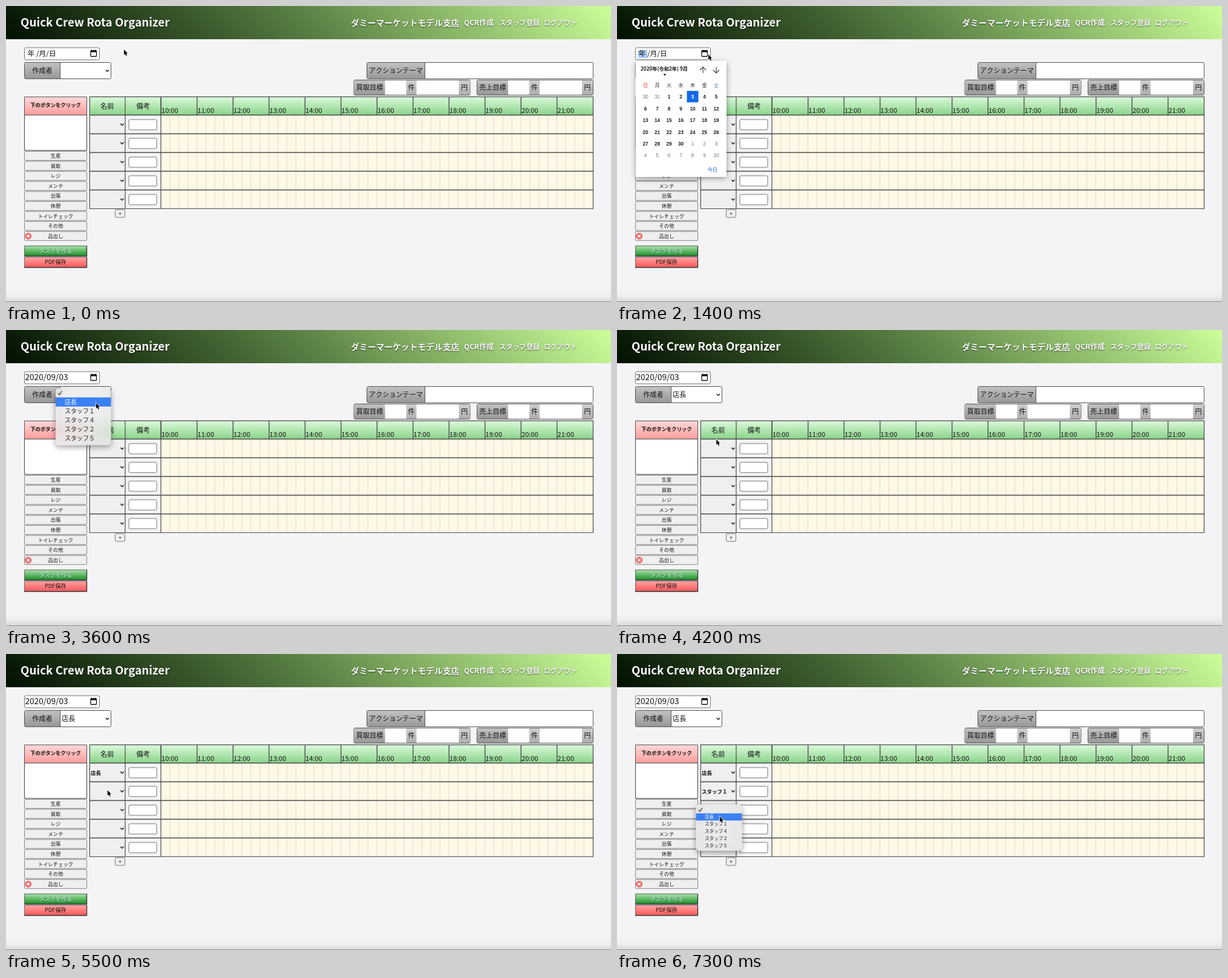
An HTML page with a canvas for the animation above (7400 ms loop, 1000 by 490 pixels).

```html
<!DOCTYPE html>
<html lang="ja">
<head>
<meta charset="utf-8">
<title>Quick Crew Rota Organizer</title>
<style>
html, body { margin: 0; width: 100%; height: 100%; overflow: hidden; background: #f4f4f6; }
canvas { display: block; }
</style>
</head>
<body>
<canvas id="stage" width="1000" height="490"></canvas>
<script>
const canvas = document.getElementById('stage');
const ctx = canvas.getContext('2d');
const JP = '"Noto Sans CJK JP", "Noto Sans CJK", sans-serif';
const LATIN = '"Liberation Sans", Arial, sans-serif';
const LOOP = 7400, HOUR = 59.5, ROW = 31;
const STAFF = ['店長', 'スタッフ１', 'スタッフ４', 'スタッフ２', 'スタッフ５'];
const TASKS = ['生産', '買取', 'レジ', 'メンテ', '出張', '休憩', 'トイレチェック', 'その他', '品出し'];

// Pointer path: time, x, y
const PATH = [
  [0, 195, 72], [300, 195, 72], [900, 149, 79], [1400, 151, 80], [2000, 125, 150],
  [2200, 125, 150], [2400, 131, 150], [2900, 150, 106], [3100, 150, 106], [3600, 149, 121],
  [3700, 149, 121], [4400, 168, 196], [4600, 168, 196], [4900, 166, 212], [5100, 166, 212],
  [5600, 168, 227], [5700, 168, 227], [6100, 168, 255], [6300, 168, 255], [6800, 170, 258],
  [7000, 170, 258], [7300, 170, 269], [7400, 170, 269]
];

function pointer(t) {
  const i = PATH.findIndex(k => k[0] > t);
  const a = PATH[i - 1], b = PATH[i];
  const p = (t - a[0]) / (b[0] - a[0]), e = p * p * (3 - 2 * p);
  return [a[1] + (b[1] - a[1]) * e, a[2] + (b[2] - a[2]) * e];
}

function text(s, x, y, size, color = '#111', weight = 400, align = 'left', family = JP) {
  ctx.font = `${weight} ${size}px ${family}`;
  ctx.textAlign = align;
  ctx.fillStyle = color;
  ctx.fillText(s, x, y);
}

function shade(y0, y1, ...colors) {
  const g = ctx.createLinearGradient(0, y0, 0, y1);
  colors.forEach((c, i) => g.addColorStop(i / (colors.length - 1), c));
  return g;
}

function box(x0, y0, x1, y1, fill, stroke, r = 0, width = 1) {
  ctx.beginPath();
  ctx.roundRect(x0 + .5, y0 + .5, x1 - x0 - 1, y1 - y0 - 1, r);
  ctx.fillStyle = fill;
  ctx.fill();
  if (stroke) {
    ctx.strokeStyle = stroke;
    ctx.lineWidth = width;
    ctx.stroke();
  }
}

function rect(x, y, w, h, fill) {
  ctx.fillStyle = fill;
  ctx.fillRect(x, y, w, h);
}

function line(color, width, ...pts) {
  ctx.beginPath();
  for (let i = 0; i < pts.length; i += 2) ctx.lineTo(pts[i], pts[i + 1]);
  ctx.strokeStyle = color;
  ctx.lineWidth = width;
  ctx.stroke();
}

function shadow(color, blur, dy, draw) {
  ctx.save();
  ctx.shadowColor = color;
  ctx.shadowBlur = blur;
  ctx.shadowOffsetY = dy;
  draw();
  ctx.restore();
}

const chevron = (x, y) => line('#222', 1.5, x - 2.7, y - 1.3, x, y + 1.5, x + 2.7, y - 1.3);

function header() {
  const g = ctx.createLinearGradient(0, 55, 527, -472);
  g.addColorStop(0, '#001000');
  g.addColorStop(.5, '#5a8044');
  g.addColorStop(1, '#ccff99');
  rect(0, 0, 1000, 55, g);
  shadow('rgba(0,0,0,.6)', 2, 1, () => {
    text('Quick Crew Rota Organizer', 24, 34, 18.8, '#fff', 700);
    text('ダミーマーケットモデル支店', 570, 32.5, 13.8, '#fff', 700);
    text('QCR作成', 757, 32, 12, '#fff', 700);
    text('スタッフ登録', 815, 32, 11.2, '#fff', 700);
    text('ログアウト', 889, 32, 11, '#fff', 700);
  });
}

function dateField(t) {
  const focused = t >= 2200 && t < 3000;
  box(30, 68.5, 155, 89.5, '#fff', focused ? '#1f5fc0' : '#767676', 2, focused ? 2 : 1);
  if (t < 2200) {
    if (t >= 1000) rect(35, 73, 15, 13, '#a9cdf8');
    text('年 /月/日', 35.5, 83, 11.8);
  } else {
    if (focused) rect(31.5, 72.5, 30, 13, '#a9cdf8');
    text('2020/09/03', 31.5, 83.3, 13.6);
  }
  box(139.5, 73.5, 150, 84, '#fff', '#111', 1, 1.3);
  rect(140, 73.5, 10, 3, '#111');
  rect(141, 72.5, 1.5, 2, '#111');
  rect(147, 72.5, 1.5, 2, '#111');
}

function fields(t) {
  const label = (x0, x1, y0, y1, s, top = '#c3c3c3', bottom = '#969696') => {
    rect(x0, y0 + 1, x1 - x0, y1 - y0 - 2, shade(y0, y1, top, bottom));
    text(s, (x0 + x1) / 2, (y0 + y1) / 2 + 4.2, 11.1, '#111', 400, 'center');
  };
  const unit = (x0, x1, s) => label(x0, x1, 122, 148, s, '#cfcfcf', '#adadad');
  const frame = (x0, y0, x1, y1) => box(x0, y0, x1, y1, '#fff', '#555', 2);

  frame(30, 93, 174, 121);
  label(31, 89, 93, 121, '作成者');
  line('#555', 1, 89.5, 93, 89.5, 121);
  chevron(167.5, 107);
  if (t >= 3700) text(STAFF[0], 92, 111, 11.2);

  frame(596, 93, 971, 121);
  label(597, 692, 93, 121, 'アクションテーマ');
  line('#555', 1, 692.5, 93, 692.5, 121);

  [[574.5, '買取目標'], [778, '売上目標']].forEach(([x, s]) => {
    frame(x, 122, x + 193, 148);
    label(x + 1, x + 52, 122, 148, s);
    unit(x + 87, x + 104, '件');
    unit(x + 174, x + 192, '円');
  });
}

function sidebar() {
  box(30, 150, 134, 181, shade(150, 180, '#ffdada', '#ff9d9d'), '#555');
  text('下のボタンをクリック', 82, 166.5, 8.4, '#111', 700, 'center');
  box(30, 180, 134, 239.5, '#fff', '#444');
  TASKS.forEach((s, i) => {
    const y = 240 + i * 16.6;
    box(30, y, 134, y + 16, '#efefef', '#858585', 1);
    text(s, 82, y + 11, 8.3, '#111', 400, 'center');
  });
  ctx.beginPath();
  ctx.arc(36.7, 381, 5.6, 0, 7);
  ctx.fillStyle = '#ee6b6b';
  ctx.fill();
  line('#fff', 1.5, 34.5, 378.8, 38.9, 383.2);
  line('#fff', 1.5, 38.9, 378.8, 34.5, 383.2);

  box(30, 396.5, 134, 414.5, shade(397, 414, '#acdfac', '#159022'), '#666');
  line('#333', 1.3, 30, 413.7, 133.5, 413.7, 133.5, 397);
  shadow('#063', 2, 1, () => text('タスクを作る', 82, 408.8, 9.2, '#eee', 400, 'center'));
  box(30, 415, 134, 433.5, shade(415, 433, '#ffa6a6', '#ff5656'), '#666');
  line('#333', 1.3, 30, 432.7, 133.5, 432.7, 133.5, 415);
  text('PDF保存', 82, 427, 9.2, '#111', 400, 'center');
}

function table(t) {
  rect(138, 150, 833, 31, shade(150, 180, '#ddfadd', '#8bd48b'));
  rect(256, 181, 715, 155, '#fff8e7');
  rect(138, 181, 59, 155, '#efeef0');
  for (let i = 1; i < 48; i++) {
    const x = 256 + i * HOUR / 4;
    line('#dedbd2', 1, x, 181, x, 336);
  }
  for (let h = 0; h < 12; h++) {
    const x = 256.3 + h * HOUR;
    line('#444', 1.3, x, 150, x, 181);
    text(`${10 + h}:00`, x + .8, 177.3, 11);
  }
  text('名前', 167.3, 169.7, 11.2, '#111', 400, 'center');
  text('備考', 226.8, 169.7, 11.2, '#111', 400, 'center');
  for (let i = 0; i < 5; i++) {
    const y = 181 + i * ROW;
    line('#4a4a4a', 1.5, 138, y - .5, 971, y - .5);
    box(202.5, y + 6.5, 249.5, y + 24.5, '#fff', '#767676', 2);
    chevron(192, y + 15);
    if (t >= [5100, 6300][i]) text(STAFF[i], 140, y + 18.5, 8.5, '#111', 700);
  }
  [150.3, 335.5].forEach(y => line('#4a4a4a', 1.2, 138, y, 971, y));
  [138.3, 197, 256, 970.5].forEach(x => line('#4a4a4a', 1.2, x, 150, x, 336));
  box(180, 336.5, 197, 350.5, '#efefef', '#767676', 2);
  text('+', 188.5, 347, 9, '#111', 500, 'center');
}

function calendar() {
  shadow('rgba(0,0,0,.45)', 9, 2, () => box(30, 90, 181.5, 283.5, '#fff'));
  text('2020年(令和2年) 9月', 39, 107, 8.2, '#111', 700);
  ctx.beginPath();
  ctx.moveTo(76.5, 112.5);
  ctx.lineTo(81.5, 112.5);
  ctx.lineTo(79, 115.5);
  ctx.fillStyle = '#111';
  ctx.fill();
  [[142, 1], [164, -1]].forEach(([x, d]) => {
    line('#333', 1.1, x, 106 - 5 * d, x, 106 + 5 * d);
    line('#333', 1.1, x - 5, 106, x, 106 - 5 * d, x + 5, 106);
  });
  const col = i => 47 + i * 19.5;
  [...'日月火水木金土'].forEach((s, i) =>
    text(s, col(i), 133.5, 8.2, i === 0 ? '#e03030' : i === 6 ? '#3355bb' : '#222', 500, 'center'));
  rect(115.5, 140.5, 19, 19, '#1569e6');
  for (let i = 0; i < 42; i++) {
    const d = i - 1, inside = d > 0 && d <= 30;
    const n = d < 1 ? d + 31 : d > 30 ? d - 30 : d;
    const color = !inside ? '#777' : d === 3 ? '#fff' : '#222';
    text(n, col(i % 7), 153.3 + Math.floor(i / 7) * 19.4, 8.3, color, inside ? 700 : 400, 'center', LATIN);
  }
  text('今日', 149.5, 273.5, 8.3, '#1569e6');
}

// Frosted panel: the blurred page shows through
function frost(x, y, w, h) {
  shadow('rgba(0,0,0,.4)', 10, 3, () => {
    ctx.beginPath();
    ctx.rect(0, 0, 1000, 490);
    ctx.roundRect(x, y, w, h, 5);
    ctx.clip('evenodd');
    box(x, y, x + w, y + h, '#ececec', '#cfcfcf', 5, .6);
  });
  ctx.save();
  ctx.beginPath();
  ctx.roundRect(x, y, w, h, 5);
  ctx.clip();
  ctx.filter = 'blur(9px)';
  ctx.drawImage(canvas, 0, 0);
  ctx.filter = 'none';
  rect(x, y, w, h, 'rgba(236,236,236,.78)');
  ctx.restore();
}

function menu(x, y, w, h, pad, pitch, size, indent, py) {
  frost(x, y, w, h);
  const active = Math.floor((py - y - pad) / pitch);
  const top = i => y + pad + i * pitch;
  rect(x, top(active), w, pitch, '#3b80f4');
  const cy = top(0) + pitch / 2;
  line(active ? '#222' : '#fff', 1.1, x + 4.5, cy + .5, x + 6.5, cy + 3, x + 10.5, cy - 3);
  STAFF.forEach((s, i) =>
    text(s, x + indent, top(i + 1) + pitch / 2 + size * .36, size, active === i + 1 ? '#fff' : '#222'));
}

function footer() {
  rect(0, 472, 1000, 18, shade(472, 490, '#f4f4f6', '#ececee', '#d8d8da'));
  rect(0, 489, 1000, 1, '#8c8c8c');
}

function cursor(x, y) {
  ctx.save();
  ctx.translate(x, y);
  ctx.beginPath();
  [[0, 0], [0, 9], [2, 7.2], [3.6, 10.6], [5.1, 9.9], [3.6, 6.6], [6.2, 6.4]]
    .forEach(p => ctx.lineTo(...p));
  ctx.closePath();
  ctx.strokeStyle = '#fff';
  ctx.lineWidth = 1.4;
  ctx.stroke();
  ctx.fillStyle = '#000';
  ctx.fill();
  ctx.restore();
}

function draw(t) {
  const [x, y] = pointer(t);
  rect(0, 0, 1000, 490, '#f4f4f6');
  header();
  dateField(t);
  fields(t);
  sidebar();
  table(t);
  footer();
  if (t >= 1000 && t < 2200) calendar();
  if (t >= 3000 && t < 3700) menu(82, 96.5, 91.5, 94, 0, 15.1, 10, 15, y);
  [[4500, 5100], [5600, 6300], [6800, LOOP]].forEach(([from, to], i) => {
    if (t >= from && t < to) menu(130.5, 187 + i * ROW, 76, 76.5, 3, 11.8, 7.6, 14.5, y);
  });
  cursor(x, y);
}

const start = performance.now();
function tick() {
  const t = (performance.now() - start) % LOOP;
  draw(Math.floor(t / 100) * 100);
  requestAnimationFrame(tick);
}
tick();
</script>
</body>
</html>
```
